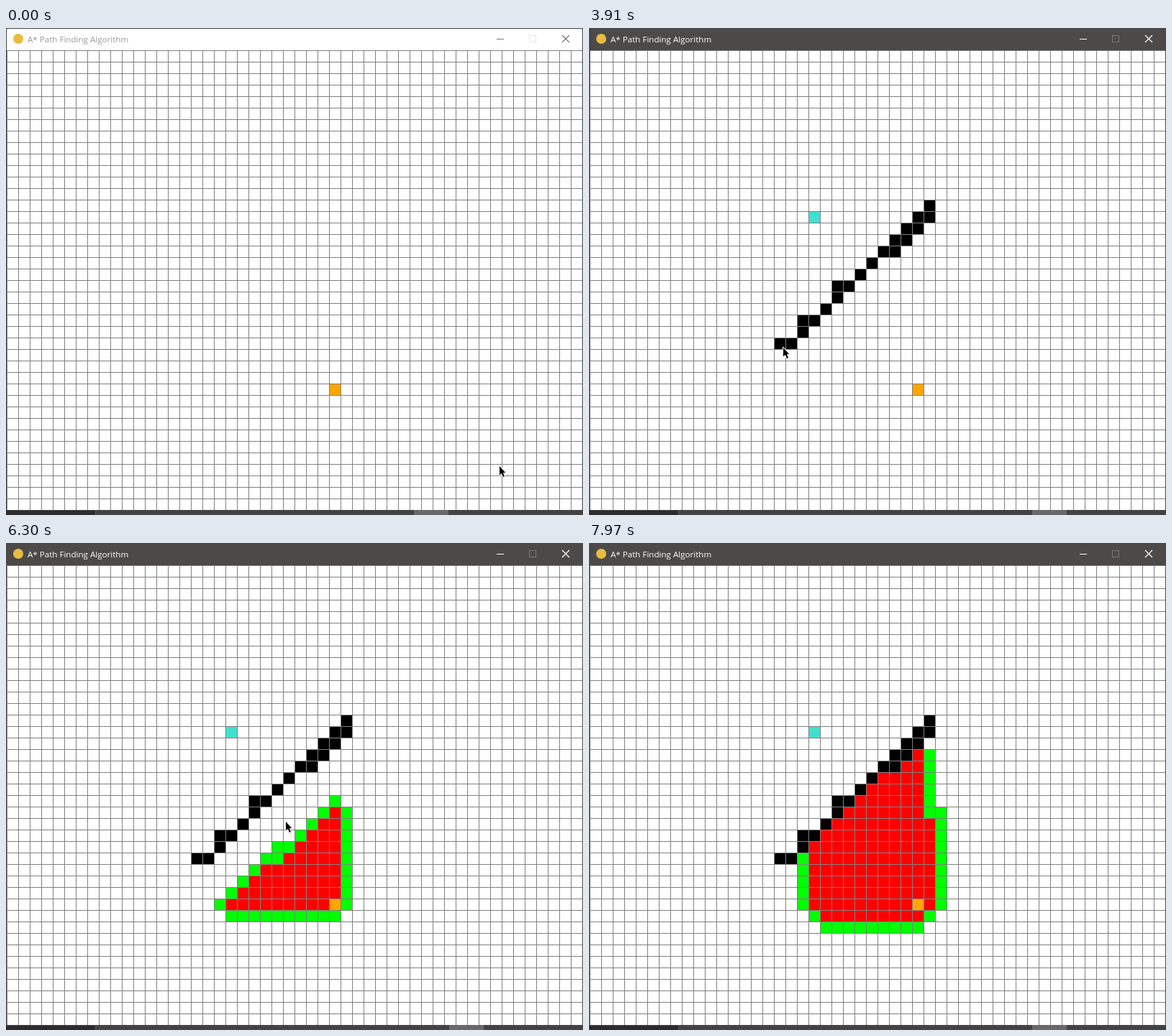
An HTML page with a canvas for the animation above (8 s loop, 802 px wide and 678 px high).

```html
<!DOCTYPE html>
<html lang="en">
<head>
<meta charset="utf-8">
<title>A* Path Finding Algorithm</title>
<style>
html, body { margin: 0; width: 802px; height: 678px; overflow: hidden; background: #fff; }
canvas { position: absolute; left: 0; top: 0; display: block; }
#title {
  position: absolute; left: 30px; top: 0; line-height: 31px; white-space: pre;
  font-family: "Open Sans", "Noto Sans", sans-serif; font-size: 11.6px;
}
</style>
</head>
<body>
<canvas id="stage" width="802" height="678"></canvas>
<span id="title">A* Path Finding Algorithm</span>
<script>
const W = 802, H = 678, LOOP = 8000;
const CELL = 16, LEFT = 1, TOP = 31, BAR = 671, SIZE = 50;
const ctx = document.getElementById('stage').getContext('2d');
const title = document.getElementById('title');

const start = { x: 28, y: 29 }, goal = { x: 19, y: 14 };

const FOCUS = 890, GOAL_SET = 940, CLICK_END = 1040;
const PRESS = 1880, STROKE_END = 3500, RELEASE = 3910;
const BEAT = 46.5;

// Pointer moves: from time, to time, new position
const home = [685, 609];
const moves = [
  [30, 660, 315, 262],
  [1200, 1640, 462, 261],
  [1640, 1760, 474, 252],
  [PRESS, 2810, 330, 385],
  [2850, STROKE_END, 269, 444],
  [4080, 4420, 388, 387],
  [6500, 6840, 406, 400],
  [6860, 7500, 815, 640]
];

// Search progress: time, iterations done
const pace = [[5210, 3], [6300, 50], [6840, 75], [7970, 120]];

const mix = (a, b, u) => a + (b - a) * u;
const smooth = u => u * u * (3 - 2 * u);

function pointerAt(t) {
  let [x, y] = home;
  for (const [from, to, nx, ny] of moves) {
    if (t < from) break;
    const u = Math.min(1, (t - from) / (to - from));
    const drawing = from >= PRESS && to <= STROKE_END;
    const v = drawing ? u : smooth(u);
    x = mix(x, nx, v);
    y = mix(y, ny, v);
  }
  return [x, y];
}

// Iterations advance in even redraws about one BEAT apart
function iterationAt(t) {
  let done = 0;
  for (let i = 0; i < pace.length - 1; i++) {
    const [t0, n0] = pace[i], [t1, n1] = pace[i + 1];
    if (t < t0) break;
    const beats = Math.round((t1 - t0) / BEAT);
    const u = Math.min(1, Math.floor((t - t0) / (t1 - t0) * beats + 0.001) / beats);
    done = Math.floor(mix(n0, n1, u) + 0.001);
  }
  return done;
}

// A falling diagonal: thick near the top, with uneven steps lower down
function buildWalls() {
  const cells = [];
  for (let y = 13; y <= 25; y++) {
    const x = 42 - y;
    cells.push({ x, y });
    if (y > 13 && y < 18) cells.push({ x: x + 1, y });
    if (y >= 20 && (y - 20) * 2 % 5 < 2) cells.push({ x: x - 1, y });
  }
  return cells;
}

// A* with Manhattan distance; ties go to the earliest queued cell
function search(walls, limit) {
  const key = c => c.y * SIZE + c.x;
  const guess = c => Math.abs(c.x - goal.x) + Math.abs(c.y - goal.y);
  const inside = c => Math.min(c.x, c.y) >= 0 && Math.max(c.x, c.y) < SIZE;
  const blocked = new Set(walls.map(key));
  const cost = new Map([[key(start), 0]]);
  const cells = new Map();
  const queue = [{ ...start, f: guess(start), n: 0 }];
  let count = 0;
  for (let step = 1; step <= limit && queue.length; step++) {
    queue.sort((p, q) => p.f - q.f || p.n - q.n);
    const cur = queue.shift();
    const g = cost.get(key(cur)) + 1;
    for (const [dx, dy] of [[1, 0], [-1, 0], [0, 1], [0, -1]]) {
      const next = { x: cur.x + dx, y: cur.y + dy }, k = key(next);
      if (!inside(next) || blocked.has(k) || cost.get(k) <= g) continue;
      cost.set(k, g);
      cells.set(k, { ...next, open: step, closed: Infinity });
      queue.push({ ...next, f: g + guess(next), n: ++count });
    }
    const own = cells.get(key(cur));
    if (own) own.closed = step + 1;
  }
  return [...cells.values()];
}

const walls = buildWalls();
const visited = search(walls, 125);

function rect(color, x, y, w, h) {
  ctx.fillStyle = color;
  ctx.fillRect(x, y, w, h);
}

function disc(color, x, y, r) {
  ctx.fillStyle = color;
  ctx.beginPath();
  ctx.arc(x, y, r, 0, 2 * Math.PI);
  ctx.fill();
}

function cell(color, c) {
  rect(color, LEFT + c.x * CELL, TOP + c.y * CELL, CELL, CELL);
}

function drawGrid(t) {
  rect('#fff', 0, TOP, W, BAR - TOP);
  const step = iterationAt(t);
  for (const c of visited) {
    if (step >= c.open) cell(step >= c.closed ? '#f00' : '#0f0', c);
  }
  if (t >= PRESS) {
    const [px, py] = pointerAt(Math.min(t, STROKE_END));
    for (const c of walls) {
      const reached = px <= LEFT + (c.x + 1) * CELL && py >= TOP + c.y * CELL;
      if (reached) cell('#000', c);
    }
  }
  cell('#ffa500', start);
  if (t >= GOAL_SET) cell('#40e0d0', goal);
  for (let x = LEFT; x < W; x += CELL) rect('#808080', x, TOP, 1, BAR - TOP);
  for (let y = TOP; y < BAR; y += CELL) rect('#808080', LEFT, y, W - 2, 1);
}

function drawFrame(active) {
  const edge = active ? '#4c4a48' : '#3f4444';
  rect(active ? edge : '#fff', 0, 0, W, TOP);
  rect(edge, 0, 0, W, 1);
  rect(edge, 0, 0, 1, BAR);
  rect(edge, W - 1, 0, 1, BAR);
  disc('#e9bb45', 17, 15, 7);

  const ink = active ? '#fff' : '#777';
  rect(ink, 682, 15, 10, 1);
  ctx.lineWidth = 1;
  ctx.strokeStyle = active ? '#7b7977' : '#e4e4e4';
  ctx.strokeRect(727.5, 10.5, 9, 9);
  ctx.lineWidth = 1.3;
  ctx.strokeStyle = ink;
  ctx.beginPath();
  ctx.moveTo(773, 10);
  ctx.lineTo(783, 20);
  ctx.moveTo(783, 10);
  ctx.lineTo(773, 20);
  ctx.stroke();
  title.style.color = active ? '#fff' : '#999';
}

function drawTaskbar(active) {
  rect('#454341', 0, BAR, W, H - BAR);
  rect('#2e2c2b', 0, BAR + 1, 124, H - BAR - 1);
  rect('#5c5a58', 124, BAR, 1, H - BAR);
  rect('#6b6968', active ? 616 : 567, BAR, 48, H - BAR);
}

const arrow = new Path2D('M1 1V13.5L3.8 11L6 16L8 15.2L5.9 10.2L9.2 10Z');

function drawPointer(t) {
  const [x, y] = pointerAt(t).map(Math.round);
  ctx.save();
  ctx.translate(x, y);
  ctx.lineJoin = 'round';
  ctx.lineWidth = 2;
  ctx.strokeStyle = '#fff';
  ctx.stroke(arrow);
  ctx.fillStyle = '#000';
  ctx.fill(arrow);
  ctx.restore();
  const down = (t >= FOCUS && t < CLICK_END) || (t >= PRESS && t < RELEASE);
  if (down) disc('rgba(255,255,0,0.5)', x, y, 12);
}

function draw(t) {
  const active = t >= FOCUS;
  drawGrid(t);
  drawFrame(active);
  drawTaskbar(active);
  drawPointer(t);
}

const begin = performance.now();
function tick() {
  draw((performance.now() - begin) % LOOP);
  requestAnimationFrame(tick);
}
tick();
</script>
</body>
</html>
```
